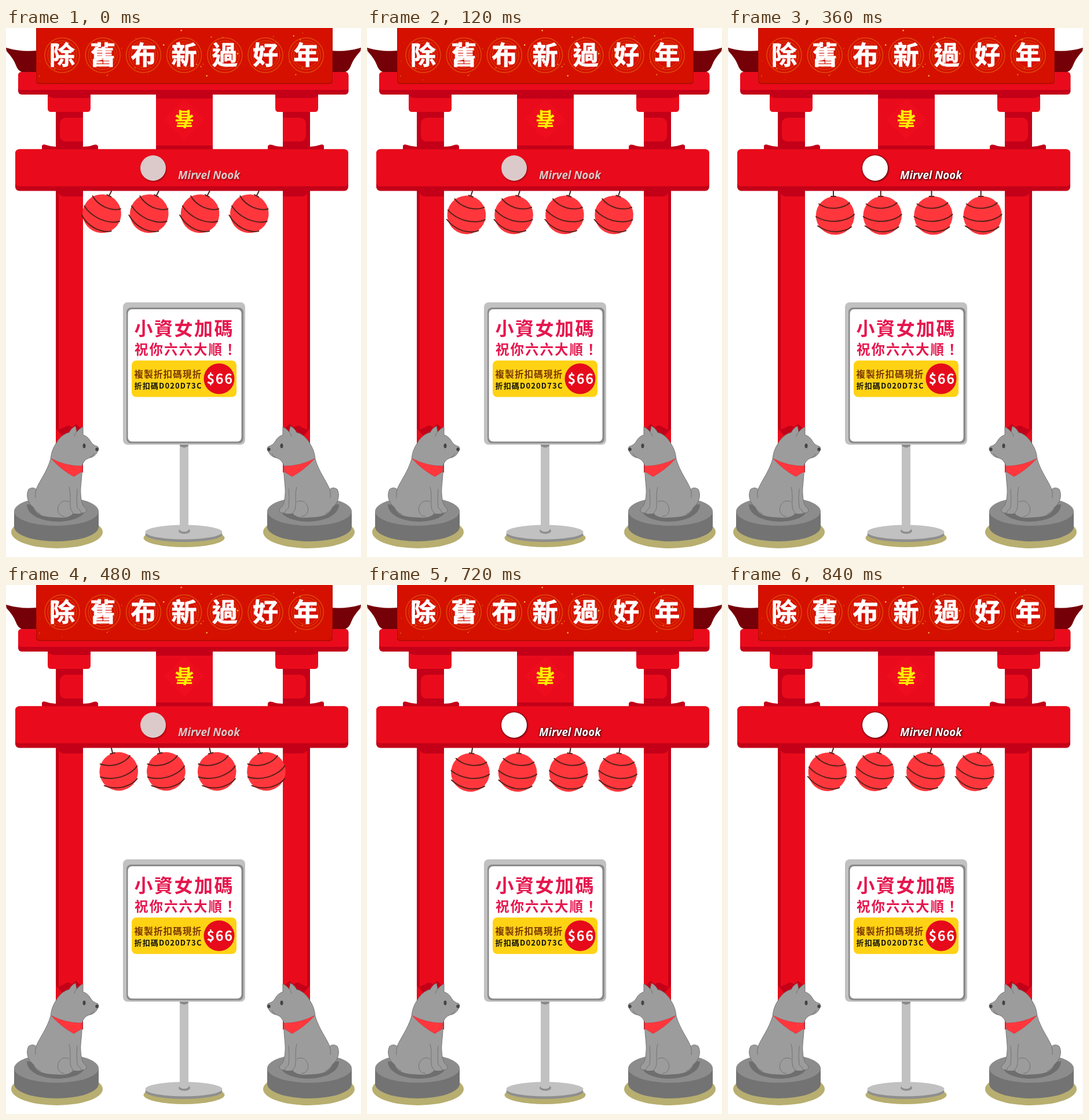
Write an HTML page that moves like this. It is 613 by 914 pixels and loops after 0.96 s.

```html
<!DOCTYPE html>
<html lang="zh-Hant">
<head>
<meta charset="utf-8">
<title>New Year gate</title>
<style>
  html, body { margin: 0; width: 100%; height: 100%; overflow: hidden; background: #fff; }
  svg { display: block; width: 100vw; height: 100vh; }
  text { font-family: "Noto Sans CJK TC", "Noto Sans CJK", "Noto Sans", sans-serif; font-weight: 700; }
  .mid { text-anchor: middle; }
  .brand { font: italic 700 18.7px "Open Sans", sans-serif; }
  #sign { fill: #dccaca; filter: drop-shadow(1px 2px 1px #a3000e); }
  #sign.lit { fill: #fff; filter: drop-shadow(0 0 1.5px #40000a) drop-shadow(1px 1px 1px #70000c); }
</style>
</head>
<body>
<svg viewBox="0 0 613 914" preserveAspectRatio="none">
  <defs>
    <g id="pillar">
      <path fill="#c30018" d="M86 140H133V768H86Z"/>
      <path fill="#e90b1b" d="M133 155H102Q93 157 93 166V186Q93 194 101 196H133Z"/>
      <path fill="#e90b1b" d="M133 291H99Q91 289 91 284V694L100 690Q108 684 114 690L121 684L133 695Z"/>
      <path fill="#e90b1b" d="M86 692L98 705L90 720H86ZM118 712H133V768H118Z"/>
      <path fill="#e90b1b" d="M72 114H146V139Q146 145 140 145H78Q72 145 72 139Z"/>
      <path fill="#c30018" d="M72 114H146V121H88Q76 121 72 117Z"/>
      <path fill="#c30018" d="M62 210V204Q63 200 69 202Q80 206 92 205H133Q145 205 151 202Q158 200 159 205V210Z"/>
    </g>

    <g id="dog">
      <ellipse cx="88" cy="871" rx="79" ry="28" fill="#b7ae70"/>
      <path fill="#737373" d="M14 835V862A73 25 0 0 0 160 862V835Z"/>
      <ellipse cx="87" cy="835" rx="73" ry="25" fill="#8c8c8c"/>
      <path fill="#6e6e6e" d="M36 823C36 842 62 853 91 853C116 852 137 844 137 830Z"/>
      <g stroke="#6f6f6f" stroke-width=".9" stroke-linejoin="round">
        <path fill="#9c9c9c" d="M105 700L109 699Q113 691 120 688L122 698Q127 692 133 689
          L133 703Q142 706 146 714Q150 721 158 723Q162 727 158 732Q154 741 143 743Q134 746 131 757
          C132 778 128 790 129 805C130 820 132 826 138 830Q142 838 131 838Q127 841 116 839
          C108 849 92 846 84 846C65 845 52 842 47 828C37 820 34 807 39 797Q46 792 52 797
          C58 782 70 768 77 745C78 737 79 730 85 720Q93 705 105 700Z"/>
        <path fill="none" d="M52 797Q50 803 51 812M47 828Q51 836 60 840M109 793C113 808 109 821 112 832Q115 836 116 839
          M123 796Q121 813 123 829Q128 832 130 838M109 819C96 812 87 826 90 836Q92 843 101 844M122 698Q118 702 118 706M145 742Q151 739 152 735"/>
      </g>
      <path fill="#ff373d" stroke="#d72831" stroke-width=".6" d="M78 744Q103 757 131 757L130 767L117 775Q95 763 78 744Z"/>
      <ellipse cx="135" cy="722" rx="2.5" ry="4" fill="#454545"/>
      <ellipse cx="157" cy="728" rx="2.7" ry="3" fill="#454545"/>
    </g>

    <g id="lantern">
      <circle cx="3" cy="42" r="33.3" fill="#ff373d"/>
      <path fill="none" stroke="#572019" stroke-width="2" stroke-linecap="round"
        d="M0 0V9M-4 9H4M-25 22Q-14 30 3 29.500Q20 28 28 20M-30 44Q-16 52.500 4 52Q26 50 36 40M-27 60Q-13 70 5 70Q23 69 31 61.500"/>
    </g>
  </defs>

  <!-- gate -->
  <path id="wing" fill="#750007" d="M0 34Q26 42 54 39V76H27Q20 73 17 64Q13 53 1 40Z"/>
  <use href="#wing" transform="matrix(-1 0 0 1 613 0)"/>
  <use href="#pillar"/>
  <use href="#pillar" transform="matrix(-1 0 0 1 611 0)"/>
  <path fill="#e90b1b" d="M259 114H357V210H259Z"/>
  <path fill="#c30018" d="M259 114H357V122H259ZM259 203H357V210H259Z"/>
  <path fill="#ed0d1d" d="M308 123L343 158L308 193L273 158Z"/>
  <text class="mid" font-size="33" fill="#ffed00" transform="translate(308 157) rotate(180)" y="12">春</text>
  <rect x="21" y="76" width="570.5" height="39" rx="6" fill="#c30018"/>
  <path fill="#e90b1b" d="M21 82Q21 76 27 76H586Q591 76 591 82V103Q591 107 586 107H27Q21 107 21 103Z"/>
  <rect x="16" y="209.500" width="575" height="72" rx="7" fill="#c30018"/>
  <rect x="16" y="209.500" width="575" height="64" rx="7" fill="#e90b1b"/>
  <rect x="52" y="-6" width="512" height="103" rx="5" fill="#b50c05"/>
  <rect x="53" y="-6" width="510" height="101" rx="5" fill="#d51000"/>
  <g id="banner"></g>

  <g id="sign">
    <circle cx="254" cy="242" r="22"/>
    <text class="brand" x="297" y="261">Mirvel Nook</text>
  </g>

  <g id="lanterns"></g>

  <!-- notice board -->
  <ellipse cx="307.500" cy="881" rx="70" ry="16" fill="#b7ae70"/>
  <ellipse cx="307" cy="875" rx="66.500" ry="13" fill="#8e8e8e"/>
  <ellipse cx="307" cy="871" rx="66.500" ry="12.500" fill="#c1c1c1"/>
  <ellipse cx="308" cy="869" rx="10" ry="5" fill="#8e8e8e"/>
  <path fill="#c1c1c1" d="M300 718H315V868Q308 873 300 868Z"/>
  <path fill="#8a8a8a" d="M300 718H315V722Q308 728 300 722Z"/>
  <rect x="202" y="474" width="211" height="246" rx="8" fill="#c1c1c1"/>
  <rect x="208" y="483" width="202" height="234.500" rx="8" fill="#8a8a8a"/>
  <rect x="210.500" y="486" width="196" height="228.500" rx="7" fill="#fff"/>
  <rect x="217" y="574.500" width="181" height="63" rx="8" fill="#ffd214"/>
  <circle cx="368" cy="606" r="26.500" fill="#e60a1b"/>
  <g fill="#e6174e">
    <text x="221.500" y="530.500" font-size="32" letter-spacing="2.500">小資女加碼</text>
    <text x="222" y="564" font-size="23.500" letter-spacing="2">祝你六六大順！</text>
  </g>
  <text x="221.500" y="604" font-size="15.500" letter-spacing="1.200" fill="#7b3800">複製折扣碼現折</text>
  <text x="221.500" y="622.500" font-size="13" letter-spacing="1.150" fill="#111">折扣碼D020D73C</text>
  <text class="mid" x="369.500" y="614.500" font-size="23.500" letter-spacing="1.500" fill="#fff">$66</text>

  <use href="#dog"/>
  <use href="#dog" transform="matrix(-1 0 0 1 611 0)"/>
</svg>

<script>
const FRAME_MS = 120, FRAMES = 8;
const swing = [27, 18, 9, 0, -13.5];
const pivots = [182, 263.7, 351.5, 436.7];
const byId = id => document.getElementById(id);

function add(parent, name, attrs, text = "") {
  const node = document.createElementNS("http://www.w3.org/2000/svg", name);
  for (const key in attrs) node.setAttribute(key, attrs[key]);
  node.textContent = text;
  return parent.appendChild(node);
}

// Banner: gold confetti, ornamental rings and the greeting
const banner = byId("banner");
let seed = 7;
const random = () => (seed = seed * 16807 % 2147483647) / 2147483647;
for (let i = 0; i < 45; i++) {
  add(banner, "circle", {
    cx: 58 + random() * 500, cy: 4 + random() * 86,
    r: 0.4 + random() * 0.9, fill: i % 3 ? "#e8791c" : "#ffc740"
  });
}
[..."除舊布新過好年"].forEach((char, i) => {
  const x = 97 + i * 70.2;
  for (const r of [30, 25, 21]) {
    add(banner, "circle", { cx: x, cy: 47, r, fill: "none", stroke: "#df4a0b", "stroke-width": r > 28 ? 1.5 : 1 });
  }
  add(banner, "text", {
    class: "mid", x, y: 62.5, "font-size": 44, fill: "#fff",
    stroke: "#fff", "stroke-width": 0.8, "stroke-linejoin": "round"
  }, char);
});

const lanterns = pivots.map(() => add(byId("lanterns"), "use", { href: "#lantern" }));

function draw() {
  const step = Math.floor(performance.now() / FRAME_MS) % FRAMES;
  const angle = swing[Math.min(step, FRAMES - step)];
  lanterns.forEach((node, i) =>
    node.setAttribute("transform", `translate(${pivots[i]} 282) rotate(${angle})`));
  byId("sign").classList.toggle("lit", step % 4 > 1);
  requestAnimationFrame(draw);
}
draw();
</script>
</body>
</html>
```
